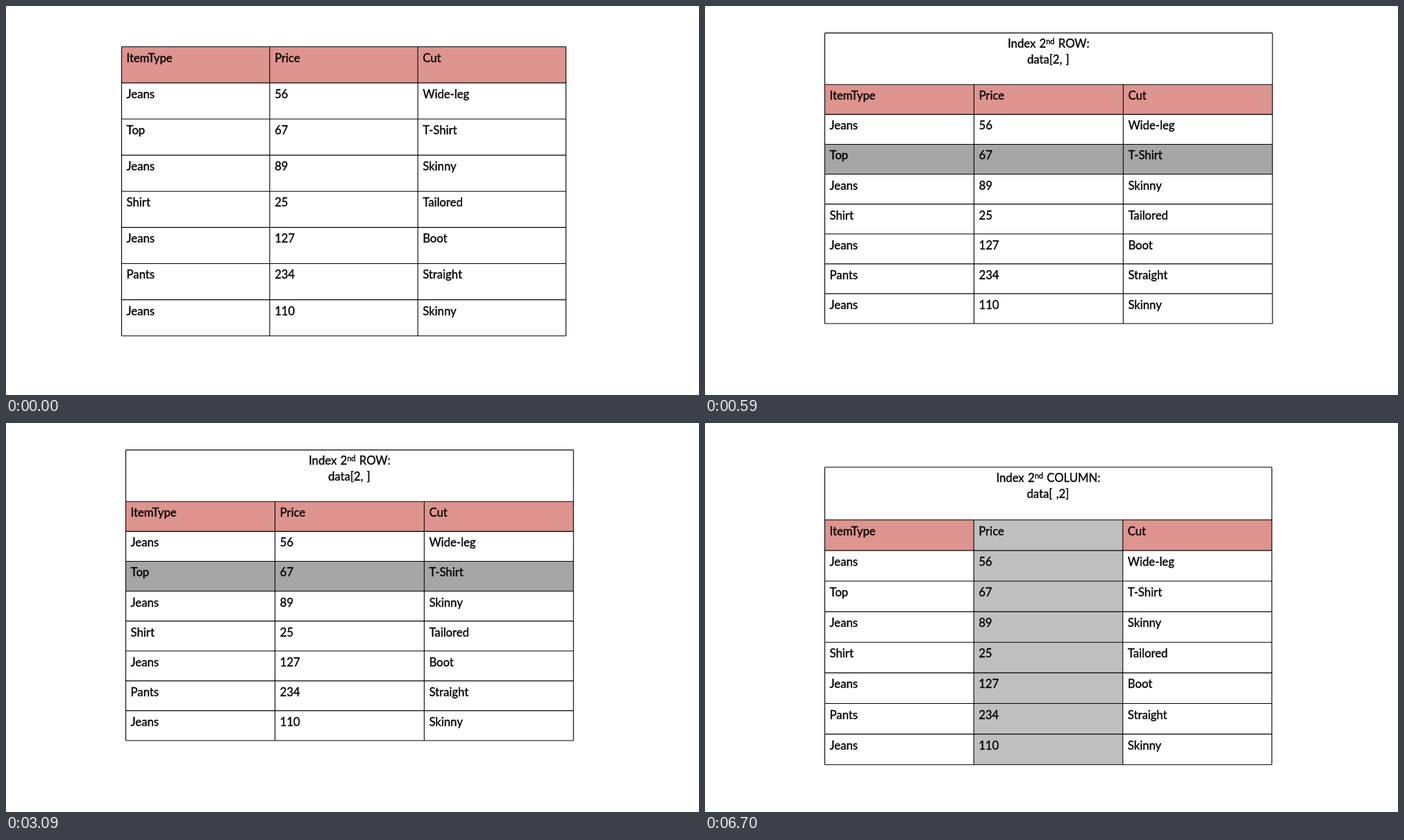
Recreate the animation shown at these times as an HTML page. Size 998 by 561 pixels, loop 8000 ms.

```html
<!DOCTYPE html>
<html lang="en">
<head>
<meta charset="utf-8">
<title>Indexing rows and columns</title>
<style>
  html, body { margin: 0; width: 100%; height: 100%; overflow: hidden; background: #fff; }
  svg { display: block; width: 998px; height: 561px; }
  text { font: 16.7px Lato, Carlito, sans-serif; word-spacing: 1px; stroke: #000; stroke-width: 0.35px; }
  .title { text-anchor: middle; }
  .sup { font-size: 11px; }
  path { fill: none; stroke: #000; stroke-width: 1.1; }
</style>
</head>
<body>
<svg id="stage" viewBox="0 0 998 561"></svg>
<script>
const LOOP = 8000;
const PINK = '#de948f';
const rows = [
  ['ItemType', 'Price', 'Cut'],
  ['Jeans', 56, 'Wide-leg'],
  ['Top', 67, 'T-Shirt'],
  ['Jeans', 89, 'Skinny'],
  ['Shirt', 25, 'Tailored'],
  ['Jeans', 127, 'Boot'],
  ['Pants', 234, 'Straight'],
  ['Jeans', 110, 'Skinny']
];

// top is the header row's upper edge; titleTop opens the merged cell above it.
const scenes = [
  { start: 0, left: 166.5, right: 806.4, top: 58.8, bottom: 475.7 },
  { start: 590, left: 172.5, right: 817.2, top: 113.3, bottom: 458,
    titleTop: 38.9, subject: 'ROW', code: 'data[2, ]', row: 2, shade: '#a6a6a6' },
  { start: 4750, left: 172.5, right: 816.3, top: 139.7, bottom: 492.8,
    titleTop: 63.7, subject: 'COLUMN', code: 'data[ ,2]', column: 1, shade: '#bfbfbf' }
];

const label = (x, y, content, attrs = '') => `<text x="${x}" y="${y}" ${attrs}>${content}</text>`;

function drawTable(s) {
  const columnWidth = (s.right - s.left) / 3;
  const rowHeight = (s.bottom - s.top) / rows.length;
  const colX = i => s.left + i * columnWidth;
  const rowY = i => s.top + i * rowHeight;
  let fills = '', texts = '', lines = '';

  rows.forEach((row, r) => row.forEach((value, c) => {
    const shaded = r === s.row || c === s.column;
    const color = shaded ? s.shade : r === 0 ? PINK : '#fff';
    fills += `<rect x="${colX(c)}" y="${rowY(r)}" width="${columnWidth}" height="${rowHeight}" fill="${color}"/>`;
    texts += label(colX(c) + 7.1, rowY(r) + 22, value);
  }));

  const outerTop = s.titleTop ?? s.top;
  for (let r = 0; r <= rows.length; r++) lines += `M${s.left} ${rowY(r)}H${s.right}`;
  for (let c = 0; c <= 3; c++) lines += `M${colX(c)} ${c % 3 ? s.top : outerTop}V${s.bottom}`;

  if (s.titleTop) {
    const center = (s.left + s.right) / 2;
    lines += `M${s.left} ${outerTop}H${s.right}`;
    texts += label(center, outerTop + 21.5,
      `Index 2<tspan class="sup" dy="-5.5">nd</tspan><tspan dy="5.5"> ${s.subject}:</tspan>`, 'class="title"');
    texts += label(center - 0.5, outerTop + 44, s.code, 'class="title"');
  }
  return `<g>${fills}<path d="${lines}"/>${texts}</g>`;
}

const stage = document.getElementById('stage');
stage.innerHTML = scenes.map(drawTable).join('');

function render() {
  const time = performance.now() % LOOP;
  const current = scenes.filter(s => s.start <= time).length - 1;
  [...stage.children].forEach((group, i) => {
    group.style.display = i === current ? 'inline' : 'none';
  });
  requestAnimationFrame(render);
}
render();
</script>
</body>
</html>
```
